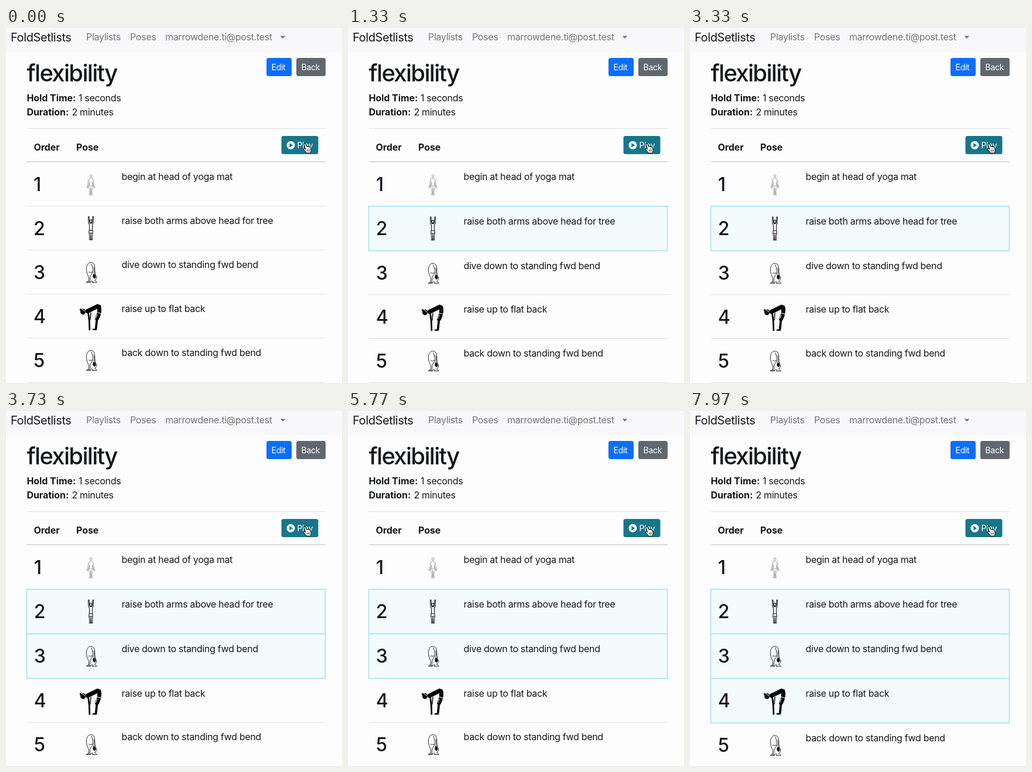
An HTML page for the animation above (8 s loop, 574x605 px).

```html
<!DOCTYPE html>
<html lang="en">
<head>
<meta charset="utf-8">
<title>Pose list</title>
<style>
  html, body { margin: 0; width: 100%; height: 100%; overflow: hidden; background: #fdfdfd; }
  svg { display: block; width: 100vw; height: 100vh; }
  text {
    font: 16px Inter, "Liberation Sans", sans-serif;
    font-optical-sizing: none;
    letter-spacing: -.02em;
    fill: #15171b;
  }
  .brand { font-size: 20px; }
  .nav { fill: #747479; }
  .title { font-size: 40px; font-weight: 500; letter-spacing: -.042em; }
  .bold { font-weight: 700; letter-spacing: -.005em; }
  .button { font-size: 14px; fill: #fff; }
  .order { font-size: 32px; font-weight: 500; }
  .rule { stroke: #dfe1e6; }
  .pose { fill: none; stroke: #15171b; stroke-linecap: round; stroke-linejoin: round; }
  .ink { fill: #08080a; stroke: none; }
  .limb { stroke: #08080a; }
  .seam { stroke: #fdfdfd; }
  .pale { stroke: #8c8c90; }
  .lit { fill: #f3fbfd; stroke: #9fe0f0; stroke-width: 1.5; opacity: 0; }

  /* Highlighted rows get thicker borders, nudging everything below them. */
  .row2, .row3, .row4, .row5, .rule3, .rule4, .order, .lit {
    animation: 8s step-end infinite;
  }
  .order { animation-name: indent; }
  .row2 { animation-name: row2; }
  .row3 { animation-name: row3; }
  .row4 { animation-name: row4; }
  .row5 { animation-name: row5; }
  .rule3 { animation-name: rule3; }
  .rule4 { animation-name: rule4; }
  .lit2 { animation-name: lit2; }
  .lit3 { animation-name: lit3; }
  .lit4 { animation-name: lit4; }

  @keyframes indent { 5.375%, 100% { translate: .7px 0; } }
  @keyframes row2 { 5.375%, 100% { translate: 0 .5px; } }
  @keyframes row3 { 5.375%, 100% { translate: 0 1.5px; } }
  @keyframes row4 {
    5.375% { translate: 0 1px; }
    46.25%, 100% { translate: 0 2.5px; }
  }
  @keyframes row5 {
    5.375% { translate: 0 1px; }
    46.25% { translate: 0 2px; }
    79.375%, 100% { translate: 0 3.5px; }
  }
  @keyframes rule3 {
    5.375% { translate: 0 1px; }
    46.25%, 100% { translate: 0 2px; }
  }
  @keyframes rule4 {
    5.375% { translate: 0 1px; }
    46.25% { translate: 0 2px; }
    79.375%, 100% { translate: 0 3px; }
  }
  @keyframes lit2 { 5.375%, 100% { opacity: 1; } }
  @keyframes lit3 { 46.25%, 100% { opacity: 1; } }
  @keyframes lit4 { 79.375%, 100% { opacity: 1; } }
</style>
</head>
<body>
<svg viewBox="0 0 574 605" preserveAspectRatio="none">
  <defs>
    <g id="stand" class="pose pale" stroke-width=".8">
      <ellipse cx="145" cy="-14" rx="1.700" ry="2.400"/>
      <path d="M144 -11v1.500l-3 1.500-1 7-1.800 7 1 .5 2.800-8M146 -11v1.500l3 1.500 1 7 1.800 7-1 .5-2.800-8"/>
      <path d="M142 -5l.5 5-1 5 1.500 6 .2 6-1 1.500h2l.8-13 .8 13h2l-1-1.500.2-6 1.500-6-1-5 .5-5M142 3h6"/>
    </g>
    <g id="reach" class="pose" stroke-width="1.100">
      <path d="M140.500 -19.500l.4 10 1.600 4.500v9h5v-9l1.600-4.500.4-10h-1.500l-.7 9-.8 2.500h-3l-.8-2.500-.7-9z"/>
      <ellipse cx="145" cy="-11.500" rx="1.700" ry="2.700"/>
      <path d="M142 4l-.2 5 .9 4-.2 7h2l.5-11 .5 11h2l-.2-7 .9-4-.2-5zM142 8.500h6"/>
    </g>
    <g id="fold" class="pose" stroke-width=".9">
      <path d="M141 17l.5-8q-4-7-4.300-14 .3-8 5-11 5-2 8 2 2 5 1.800 13l1 5"/>
      <path d="M146 -14q3 9 2 15l-4 6-1 10M141.500 0q3 1 6 0M150 -9q1 6 .4 11l-2 5"/>
      <path d="M141 15l-4 2.500h7.500M143 17.500l4-3 2 3M147 17.500h8.500l-4-3.500"/>
      <path d="M152 3q3 4 3 7l-3 4"/>
      <path class="ink" d="M149.500 3q4 1 4 6l-2 2.500-3-2.500z"/>
    </g>
    <g id="flat" class="pose limb">
      <ellipse class="ink" cx="131.500" cy="-7.500" rx="4.500" ry="5"/>
      <circle class="ink" cx="127.800" cy="-11" r="2"/>
      <path d="M139.500 -8.500L156 -16.500" stroke-width="7.500"/>
      <path d="M159 -16q2 9-3.500 20" stroke-width="7"/>
      <path d="M155.500 4l-1.800 17" stroke-width="3.800"/>
      <path d="M154 22.800h-5" stroke-width="2.500"/>
      <path d="M140.500 -6l1.800 14 .5 15" stroke-width="2.800"/>
      <path d="M145 -6l-1 12" stroke-width="1.500"/>
      <path class="seam" d="M151.500 -7l11 2.500M128 -13l7 5M153 4l3-7" stroke-width="1"/>
    </g>
  </defs>

  <rect width="574" height="605" fill="#fdfdfd"/>
  <rect width="574" height="41.500" fill="#f8f8fb"/>
  <text class="brand" x="8" y="23">FoldSetlists</text>
  <text class="nav" x="137" y="21">Playlists</text>
  <text class="nav" x="212" y="21">Poses</text>
  <text class="nav" x="272" y="21">marrowdene.ti@post.test</text>
  <path d="M468.500 13.500h9l-4.500 4.500z" fill="#747479"/>

  <text class="title" x="35.500" y="91">flexibility</text>
  <text class="bold" x="35.500" y="125">Hold Time:</text>
  <text x="124" y="125">1 seconds</text>
  <text class="bold" x="35.500" y="149">Duration:</text>
  <text x="112.500" y="149">2 minutes</text>

  <rect x="445" y="51" width="43" height="31" rx="3.500" fill="#0d6efd"/>
  <text class="button" x="453.500" y="72">Edit</text>
  <rect x="496" y="51" width="50" height="31" rx="3.500" fill="#60686e"/>
  <text class="button" x="504.500" y="72">Back</text>

  <path class="rule" d="M36 171.500H546"/>
  <text class="bold" x="47.500" y="209">Order</text>
  <text class="bold" x="120" y="209">Pose</text>
  <rect x="470.500" y="184" width="63" height="31" rx="3.500" fill="#177687"/>
  <circle cx="486.500" cy="199.700" r="7" fill="#fff"/>
  <path d="M484.300 196v7.400l6-3.700z" fill="#177687"/>
  <text class="button" x="497.500" y="205">Play</text>
  <path d="M36 227.800H546" stroke="#d3d4de" stroke-width="1.800"/>

  <path class="rule" d="M36 303.500H546"/>
  <path class="rule rule3" d="M36 378.500H546"/>
  <path class="rule rule3" d="M36 453.500H546"/>
  <path class="rule rule4" d="M36 528.500H546"/>
  <path class="rule rule4" d="M36 603.500H546"/>
  <rect class="lit lit2" x="35.500" y="303.700" width="510" height="76"/>
  <rect class="lit lit3" x="35.500" y="379.700" width="510" height="76"/>
  <rect class="lit lit4" x="35.500" y="455.700" width="510" height="76"/>

  <g transform="translate(0 266)">
    <g>
      <text class="order" x="47" y="11.500">1</text>
      <use href="#stand"/>
      <text x="197.500" y="-7">begin at head of yoga mat</text>
    </g>
  </g>
  <g transform="translate(0 341)">
    <g class="row2">
      <text class="order" x="47" y="11.500">2</text>
      <use href="#reach"/>
      <text x="197.500" y="-7">raise both arms above head for tree</text>
    </g>
  </g>
  <g transform="translate(0 416)">
    <g class="row3">
      <text class="order" x="47" y="11.500">3</text>
      <use href="#fold"/>
      <text x="197.500" y="-7">dive down to standing fwd bend</text>
    </g>
  </g>
  <g transform="translate(0 491)">
    <g class="row4">
      <text class="order" x="47" y="11.500">4</text>
      <use href="#flat"/>
      <text x="197.500" y="-7">raise up to flat back</text>
    </g>
  </g>
  <g transform="translate(0 566)">
    <g class="row5">
      <text class="order" x="47" y="11.500">5</text>
      <use href="#fold"/>
      <text x="197.500" y="-7">back down to standing fwd bend</text>
    </g>
  </g>

  <!-- Pointing hand -->
  <path d="M509 197.500q1.500-1.500 2.800.3l1.900 4.200q1.500-1 2.500.3 1.500-.8 2.300.5 1.700-.4 2 1.400l.8 4.300-1 4.500h-6.800l-5-6q-.5-1.800 1.200-1.700l1.800 1.200z" fill="#fff" stroke="#16160e" stroke-width="1.100" stroke-linejoin="round"/>
  <path d="M514.500 207v3.500M516.500 207v3.500M518.500 207v3.500" stroke="#16160e" stroke-width=".8"/>
</svg>
</body>
</html>
```
